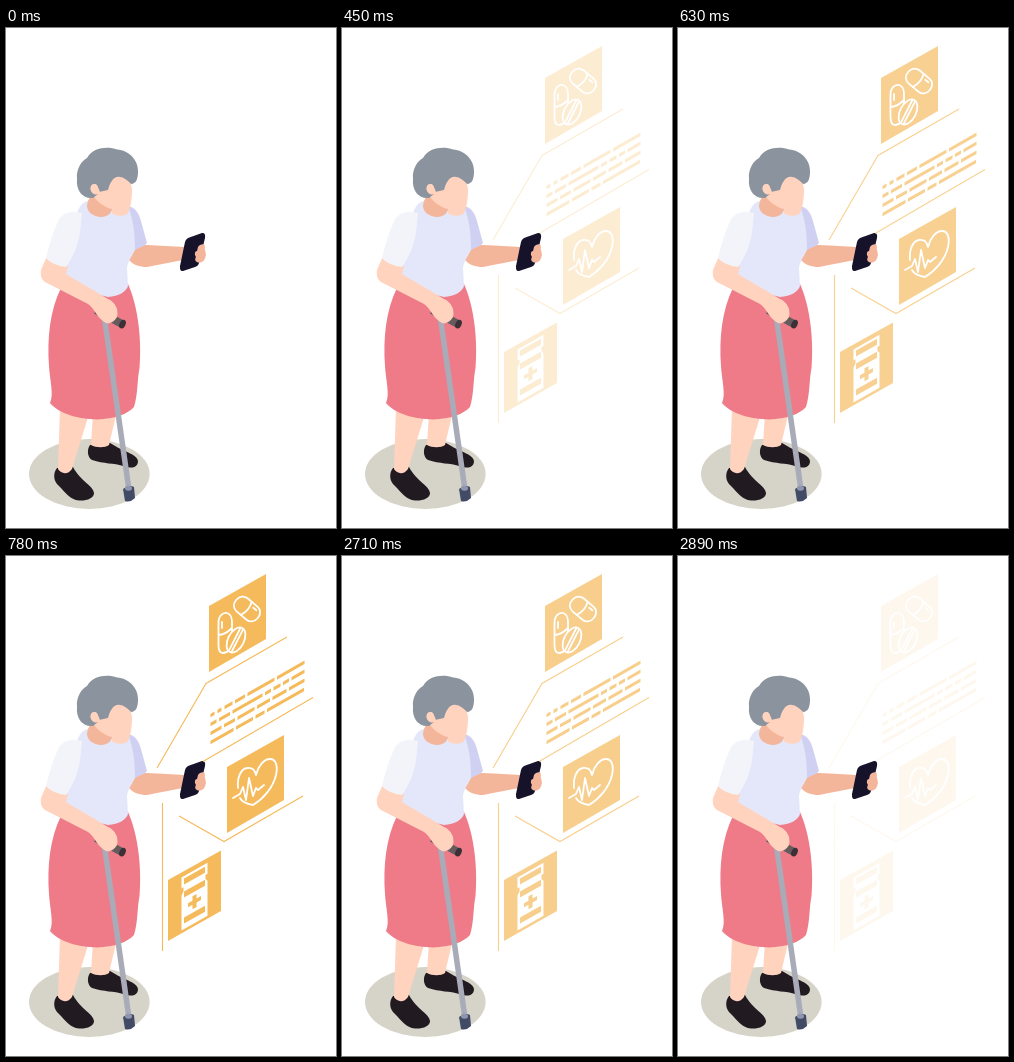
An HTML page for the animation above (2920 ms loop, 330x500 px).

```html
<!DOCTYPE html>
<html lang="en">
<head>
<meta charset="utf-8">
<title>Woman with a phone</title>
<style>
  html, body { margin: 0; height: 100%; overflow: hidden; background: #fff; }
  svg { display: block; width: 330px; height: 500px; }
  .skin { fill: #ffd3bd; }
  .shade { fill: #f4b69b; }
  .shoe { fill: #211a20; }
  .gold { fill: #f5ba5b; }
  .rule { fill: none; stroke: #f5ba5b; stroke-width: 1.1; }
  .icon { fill: none; stroke: #fff; stroke-width: 1.8; stroke-linecap: round; stroke-linejoin: round; }
  .words { stroke: #f5ba5b; stroke-width: 3.5; }
</style>
</head>
<body>
<svg viewBox="0 0 330 500">
  <ellipse cx="83.300" cy="446" rx="60.300" ry="35" fill="#d6d3c8"/>

  <!-- legs and shoes -->
  <path class="shoe" d="M84 417C81 421 81 429 86 432C98 436 108 435 117 438C125 441 132 440 132 433C131 426 118 424 104 415Z"/>
  <path class="skin" d="M87 385L85 417C90 420 99 420 103 417L111 383Z"/>
  <path class="shoe" d="M51 440C47 445 47 453 53 458C59 464 64 472 73 472.500C81 473 88 470 88 465C87 457 75 454 67 439Z"/>
  <path class="skin" d="M54 380L52 441C55 446 62 447 66 441L83 386Z"/>
  <path fill="#ef7b88" d="M55 260C44 282 41 310 43 338C44 354 48 366 44 375C53 386 73 391 91 391.500C108 391 122 386 128 379C132 366 131 353 133.500 340C136 312 132 278 122 256Z"/>

  <!-- far arm and phone -->
  <path class="shade" d="M126 224C131 219 135 217 141 217L179 219L177 232L141 239C133 239 127 237 122 231Z"/>
  <path fill="#d0d1f2" d="M120 177C129 179 133 185 135 193L141 215C138 219 132 219 127 224Z"/>
  <path fill="#15122a" d="M182 210L196 205C199 205 199.500 207 199 210L193 235C192 238 191 238 189 239L177 243C174 243 174 241 174 238L179 214C180 211 181 211 182 210Z"/>
  <path class="shade" d="M192 219C194 216 199 215 199 219C198 221 200 224 200 227C199 231 198 234 194 234.500C190 235 188 232 190 229C188 226 189 223 191 223Z"/>

  <!-- blouse and head -->
  <path fill="#e4e6f9" d="M79 174C73 178 69 184 70 200L57 243C67 255 86 266 102 269C113 268 120 264 122 258L121 240C122 233 125 230 129 222C129 205 127 188 121 177C113 173 91 170 79 174Z"/>
  <path class="shade" d="M82 173C78 184 88 189 96 189C103 188 107 184 106 178L103 162L87 163Z"/>
  <path class="skin" d="M87 156C94 150 106 147 114 147C121 148 126 154 126 162C126 172 124 183 121 186C118 188 111 189 106 185V181C96 179 87 170 85 163Z"/>
  <path fill="#8b939e" d="M87 170C76 171 70 162 71 151C70 142 75 133 81 130C87 119 102 118 111 121.500C123 122 133 133 132 144C132 151 130 156 125 156C121 152 116 148 111 149C107 150 104 154 102 162L93 164C92 155 87 154 85 159C84 163 87 166 92 166Z"/>
  <path class="skin" d="M91 157C87 154 83 158 85 163C87 167 91 168 94 164Z"/>

  <!-- cane -->
  <path d="M90 282L116 296" stroke="#665a5f" stroke-width="8"/>
  <ellipse cx="116.500" cy="296.200" rx="3" ry="4.500" fill="#3a3036" transform="rotate(25 116.500 296.200)"/>
  <path d="M98 287L123 462" stroke="#a9abb8" stroke-width="5.500"/>
  <path fill="#414b66" d="M117 461Q123 456 128 459L129 470Q124 475 119 473Z"/>
  <ellipse cx="122.500" cy="460.300" rx="3.500" ry="2.500" fill="#8d96ad"/>

  <!-- near arm -->
  <path class="skin" d="M41 228L35 242C34 249 36 253 41 255L82 276C88 280 91 289 97 293C102 298 108 294 111 289C113 281 109 274 102 271L60 246L62 238Z"/>
  <path fill="#f2f4f9" d="M76 185C67 182 58 184 53 191C47 204 43 217 40 230C44 235 52 238 60 239C68 228 72 216 74 205Z"/>

  <g id="overlay" opacity="0">
    <path class="rule" d="M151 212L200 127.500L281 81M197 205.500L307 141.500M173 260L218 285.500L297 240M156.500 247V395"/>
    <path class="gold" d="M203 50L260 18V83L203 116ZM221 211L278 179V244L221 277ZM162 324L215 294.500V355L162 385Z"/>

    <g class="words" transform="translate(204.500 159.500) skewY(-29.500)">
      <path d="M0 0H94" stroke-dasharray="4 3 4 3 8 2.500 10 2.500 27 2.500 28 9"/>
      <path d="M0 9H94" stroke-dasharray="6 2.500 11 2.500 30 2.500 6 2.500 7 2.500 6 2.500 14 9"/>
      <path d="M0 18H94" stroke-dasharray="11 2.500 11 2.500 17 2.500 13 2.500 14 2.500 16 9"/>
      <path d="M0 27H94" stroke-dasharray="23 2.500 17 2.500 9 2.500 37 9"/>
    </g>

    <!-- pills -->
    <g class="icon">
      <g transform="translate(241 53) rotate(40)">
        <rect x="-14" y="-8.500" width="28" height="17" rx="7.500"/>
        <path d="M-1 -8.500Q3 0 -1 8.500M4 -5H8"/>
      </g>
      <path d="M212.500 68C212 60 217 56 221 57C225 58 226 62 226 66V87C226 92 222 97 217 97C213 97 212.500 93 212.500 89ZM212.500 79Q219 79 226 72M216 66V72"/>
      <g transform="translate(230 84) rotate(27)">
        <ellipse class="gold" rx="8" ry="13.500"/>
        <path d="M-1.500 -13V13M1.500 -13V13"/>
      </g>
    </g>

    <!-- heartbeat -->
    <path class="icon" d="M232 232C231 221 235 213 241 212C246 211 249 214 250 219C252 210 258 203 264 203C270 203 272 210 270 219C267 232 257 243 247 249C241 248 236 246 234 242M227 242L234 238L237 231L240 244L243 222L247 240L250 232L252 234L258 229"/>

    <!-- medicine bottle -->
    <g transform="translate(175.500 321.500) skewY(-29.500)">
      <path fill="#fff" d="M0 0H26V11H24V15L26 18V53H0V18L2 15V11H0Z"/>
      <path class="gold" d="M2.500 2.500H23.500V8.500H2.500ZM2.500 15.500H23.500V21.500H2.500ZM2.500 41.500H23.500V47.500H2.500ZM11 25H15V29.500H19.500V33.500H15V38H11V33.500H6.500V29.500H11Z"/>
    </g>
  </g>
</svg>
<script>
  const LOOP = 2920, STEP = 30, FADE_IN = 360, FADE_OUT = 2650;
  const overlay = document.getElementById('overlay');
  const start = performance.now();

  function opacityAt(t) {
    const stepsSince = from => Math.floor((t - from) / STEP) + 1;
    if (t < FADE_IN) return 0;
    if (t < FADE_OUT) return Math.min(1, stepsSince(FADE_IN) / 15);
    return Math.max(0, 1 - stepsSince(FADE_OUT) / 10);
  }

  function draw() {
    const t = Math.max(0, performance.now() - start) % LOOP;
    overlay.setAttribute('opacity', opacityAt(t));
    requestAnimationFrame(draw);
  }
  draw();
</script>
</body>
</html>
```
